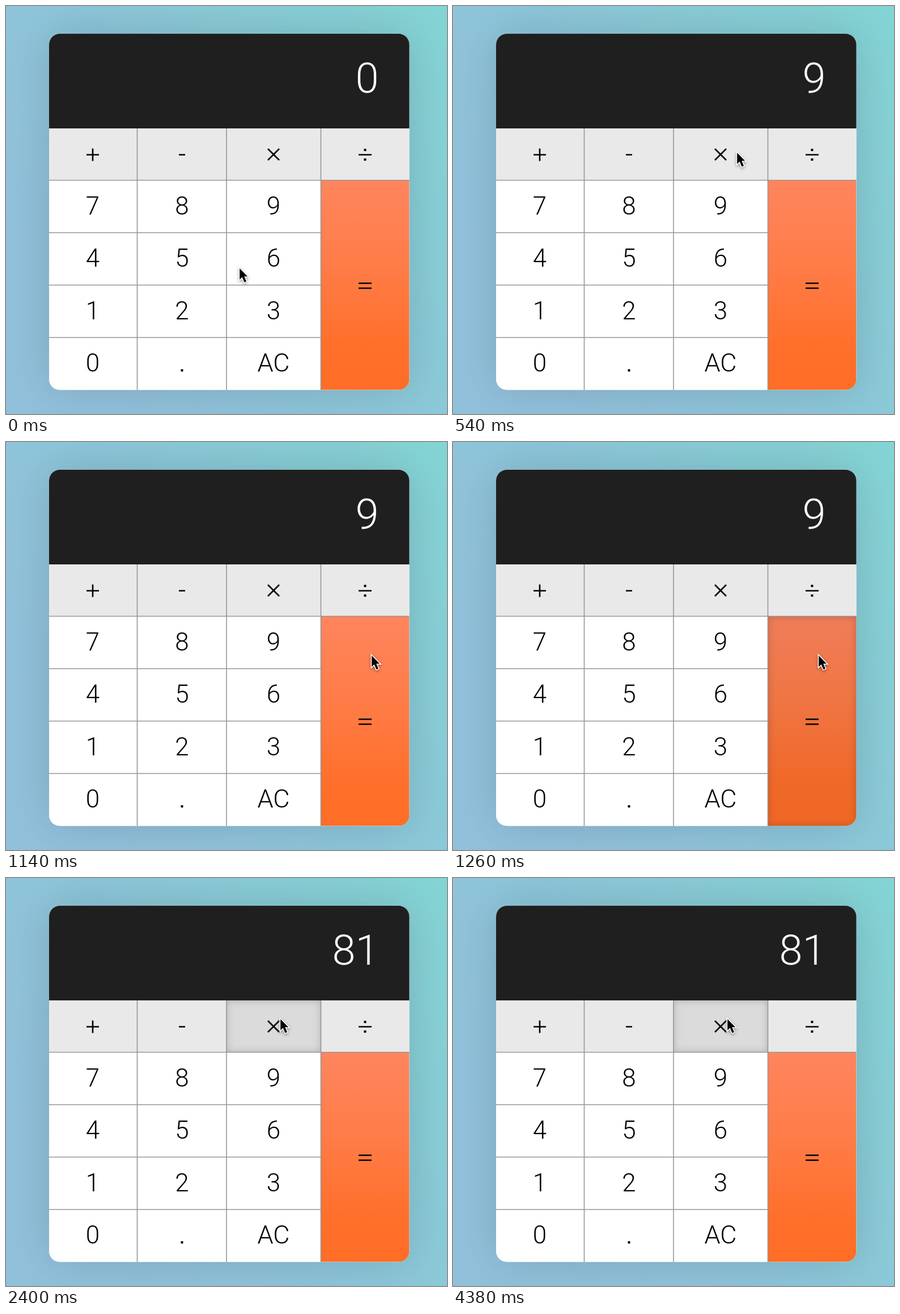
Animation of 778x720 px, one loop 4440 ms. Source, as an HTML page with a canvas:

```html
<!DOCTYPE html>
<html lang="en">
<head>
<meta charset="utf-8">
<title>Calculator</title>
<style>
html, body { margin: 0; width: 100%; height: 100%; overflow: hidden; background: #8ac6d8; }
canvas { display: block; }
</style>
</head>
<body>
<canvas id="stage" width="778" height="720"></canvas>
<script>
const ctx = document.getElementById('stage').getContext('2d');
const W = 778, H = 720, LOOP = 4440, STEP = 60;
const PANEL = { x: 76, y: 49, w: 635.5, h: 628.5, r: 19 };
const FONT = 'Roboto, "Liberation Sans", Arial, sans-serif';
const COLS = [76, 231.5, 389, 555.5, 711.5];
const ROWS = [216, 307.5, 400, 492.5, 585, 677.5];
const CENTERS = [153, 310.5, 472, 633.5];

const KEYS = [['7', '8', '9'], ['4', '5', '6'], ['1', '2', '3'], ['0', '.', 'AC']];

// Pointer tip: [time, x, y]
const PATH = [
  [0, 411, 461], [180, 479, 358], [300, 479, 356], [540, 500, 257],
  [600, 490, 251], [720, 488, 250], [900, 482, 352], [960, 484, 353],
  [1140, 644, 375], [1620, 644, 375], [1800, 583, 332], [1980, 483, 247]
];

// Key held down: [from, to, column, row]
const PRESSES = [
  [240, 300, 2, 1], [660, 900, 2, 0], [900, 960, 2, 1],
  [1260, 1380, 3, 1], [2040, LOOP, 2, 0]
];

function pointerAt(t) {
  const i = PATH.findIndex(p => p[0] > t);
  if (i < 0) return PATH[PATH.length - 1].slice(1);
  const [t0, x0, y0] = PATH[i - 1], [t1, x1, y1] = PATH[i];
  const k = (t - t0) / (t1 - t0);
  return [x0 + (x1 - x0) * k, y0 + (y1 - y0) * k];
}

function readout(t) {
  return t < 300 ? '0' : t < 1380 ? '9' : '81';
}

function gradient(x0, y0, x1, y1, stops) {
  const g = ctx.createLinearGradient(x0, y0, x1, y1);
  stops.forEach(([at, color]) => g.addColorStop(at, color));
  return g;
}

function box(x, y, w, h, color) {
  ctx.fillStyle = color;
  ctx.fillRect(x, y, w, h);
}

function panelPath() {
  ctx.beginPath();
  ctx.roundRect(PANEL.x, PANEL.y, PANEL.w, PANEL.h, PANEL.r);
}

function line(x0, y0, x1, y1, color, width) {
  ctx.strokeStyle = color;
  ctx.lineWidth = width;
  ctx.beginPath();
  ctx.moveTo(x0, y0);
  ctx.lineTo(x1, y1);
  ctx.stroke();
}

function label(text, x, y, size, color) {
  ctx.font = `300 ${size}px ${FONT}`;
  ctx.textAlign = 'center';
  ctx.textBaseline = 'alphabetic';
  ctx.fillStyle = color;
  ctx.fillText(text, x, y);
}

function drawBackdrop() {
  box(0, 0, W, H, gradient(778, 0, 58, 486, [[0, '#84d5d5'], [0.62, '#8ec6da'], [1, '#92c1dc']]));
  ctx.save();
  ctx.shadowColor = 'rgba(0,0,0,.15)';
  ctx.shadowBlur = 80;
  ctx.fillStyle = '#fff';
  panelPath();
  ctx.fill();
  ctx.restore();
}

function drawKeys() {
  box(76, 216, 636, 92, '#e9e9e9');
  box(76, 307.5, 480, 370, '#fff');
  box(555.5, 307.5, 156, 370, gradient(0, 308, 0, 677,
    [[0, '#ff855e'], [0.4, '#ff7c48'], [0.8, '#ff6f2a'], [1, '#ff6d26']]));
}

function drawPress(col, row) {
  const x = COLS[col], y = ROWS[row];
  const w = COLS[col + 1] - x;
  const h = (col === 3 && row > 0 ? ROWS[5] : ROWS[row + 1]) - y;
  ctx.save();
  ctx.beginPath();
  ctx.rect(x, y, w, h);
  ctx.clip();
  box(x, y, w, h, 'rgba(0,0,0,.06)');
  ctx.shadowColor = 'rgba(0,0,0,.2)';
  ctx.shadowBlur = 14;
  ctx.fillStyle = '#000';
  ctx.beginPath();
  ctx.rect(x - 40, y - 40, w + 80, h + 80);
  ctx.rect(x, y, w, h);
  ctx.fill('evenodd');
  ctx.restore();
}

function drawGrid() {
  ROWS.slice(1, 5).forEach((y, i) => line(76, y, i ? 555.5 : 712, y, '#969696', 1.6));
  COLS.slice(1, 4).forEach(x => line(x, 216, x, 678, '#969696', 1.6));
}

function drawSigns() {
  const [plus, minus, times, over] = CENTERS;
  const sign = (x0, y0, x1, y1) => line(x0, y0, x1, y1, '#000', 2.6);
  sign(plus - 11, 262.5, plus + 11, 262.5);
  sign(plus, 251.5, plus, 273.5);
  sign(minus - 5.5, 262.5, minus + 5.5, 262.5);
  sign(times - 10, 252, times + 10, 272);
  sign(times - 10, 272, times + 10, 252);
  sign(over - 11.5, 262.5, over + 11.5, 262.5);
  box(over - 2, 252, 4, 4, '#000');
  box(over - 2, 269, 4, 4, '#000');
  sign(over - 11.5, 489.3, over + 11.5, 489.3);
  sign(over - 11.5, 498, over + 11.5, 498);
}

function drawLabels() {
  KEYS.forEach((row, r) => row.forEach((text, c) => {
    const y = 367.5 + r * 92.5;
    if (text === '.') box(CENTERS[c] - 2, y - 4, 4, 4, '#000');
    else label(text, CENTERS[c], y, text === 'AC' ? 45 : 44, '#000');
  }));
}

function drawReadout(text) {
  box(76, 49, 636, 167, '#1f1f1f');
  [...text].reverse().forEach((d, i) => label(d, 637 - i * 41, 153, 74, '#fff'));
}

function drawPointer(x, y) {
  ctx.save();
  ctx.translate(x + 1.2, y + 2);
  ctx.beginPath();
  ctx.moveTo(0, 0);
  [[0, 19.8], [4.5, 15.6], [8.3, 24.4], [11.8, 22.9], [8.1, 14.3], [14, 14.3]]
    .forEach(p => ctx.lineTo(...p));
  ctx.closePath();
  ctx.lineWidth = 3;
  ctx.strokeStyle = '#fff';
  ctx.shadowColor = 'rgba(0,0,0,.4)';
  ctx.shadowBlur = 5;
  ctx.shadowOffsetY = 2;
  ctx.stroke();
  ctx.shadowColor = 'transparent';
  ctx.fillStyle = '#000';
  ctx.fill();
  ctx.restore();
}

function draw(t) {
  drawBackdrop();
  ctx.save();
  panelPath();
  ctx.clip();
  drawReadout(readout(t));
  drawKeys();
  PRESSES.filter(([from, to]) => t >= from && t < to)
    .forEach(([, , col, row]) => drawPress(col, row));
  drawGrid();
  drawSigns();
  drawLabels();
  ctx.restore();
  drawPointer(...pointerAt(t));
}

const start = performance.now();
function tick() {
  const t = (performance.now() - start) % LOOP;
  draw(Math.floor(t / STEP) * STEP);
  requestAnimationFrame(tick);
}
tick();
</script>
</body>
</html>
```
